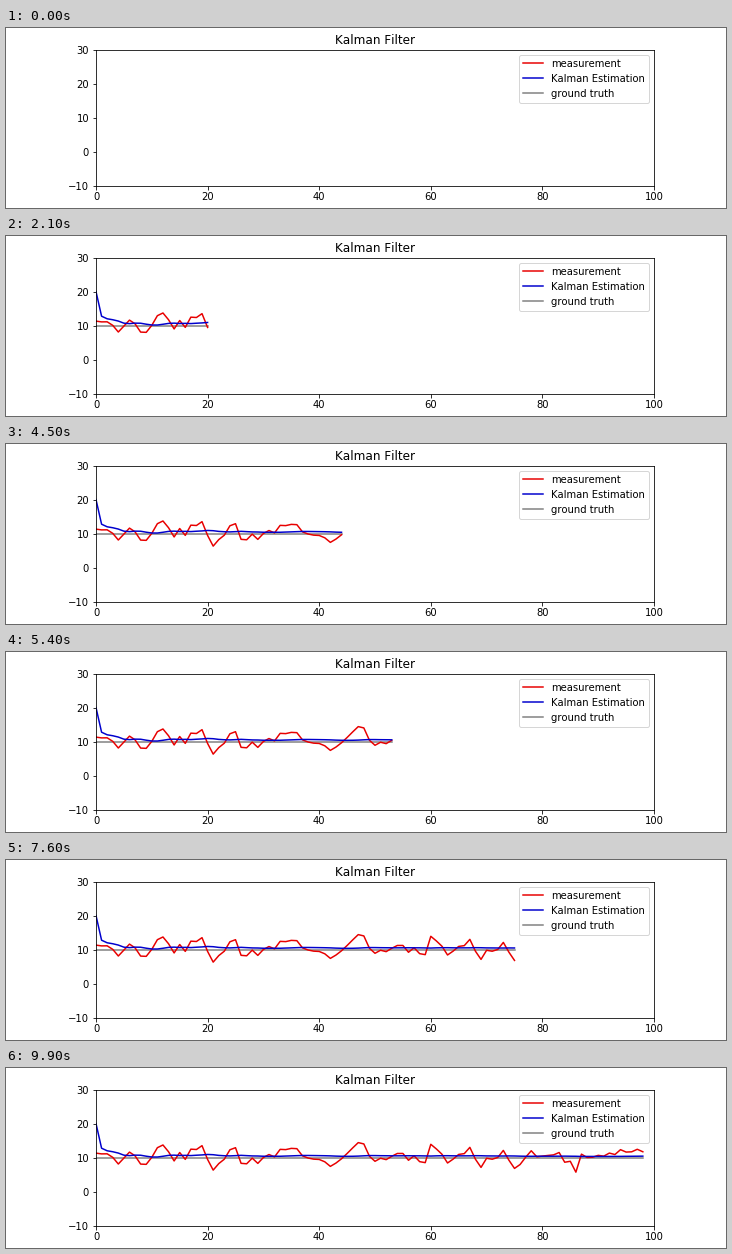
These frames come from a looping animation (720 by 180 pixels, 10 s). A matplotlib script:

```python
import matplotlib.pyplot as plt
import numpy as np
from matplotlib.animation import FuncAnimation

STEPS = 100
TRUTH = 10
START = 20        # initial state estimate
P0, R = 20, 4     # initial variance, measurement variance
JITTER = 0.7

# Main swings of the sensor; noise fills the steps between them.
SWINGS = [
    (0, 11.3), (2, 11.1), (4, 8.1), (6, 11.6), (9, 8.0), (12, 13.7),
    (14, 9.0), (19, 13.5), (21, 6.3), (25, 12.9), (26, 8.3), (35, 12.7),
    (42, 7.4), (47, 14.4), (50, 8.9), (54, 11.2), (59, 8.5), (60, 13.9),
    (63, 8.4), (67, 13.0), (69, 7.1), (73, 12.1), (75, 6.8), (78, 12.0),
    (85, 8.9), (86, 5.7), (87, 11.0), (98, 11.7),
]


def measure(swings, count, jitter):
    x, y = zip(*swings)
    noise = np.random.default_rng(4).normal(0, jitter, count)
    noise[list(x)] = 0
    return np.interp(np.arange(count), x, y) + noise


def kalman(zs, x, p, r):
    """Estimates of a constant state, each before its measurement is used."""
    out = []
    for z in zs:
        out.append(x)
        gain = p / (p + r)
        x += gain * (z - x)
        p *= 1 - gain
    return np.array(out)


measured = measure(SWINGS, STEPS - 1, JITTER)
estimate = kalman(measured, START, P0, R)
truth = np.full(len(measured), TRUTH)

plt.rcParams["font.family"] = "DejaVu Sans"
plt.rcParams["text.kerning_factor"] = 6   # whole-pixel letter spacing
fig, ax = plt.subplots(figsize=(10, 2.5), dpi=72)
fig.subplots_adjust(left=0.125, right=0.9, bottom=0.125, top=0.88)
ax.set(xlim=(0, 100), ylim=(-10, 30), title="Kalman Filter")

series = [
    (measured, "#e80000", "measurement", 2),
    (estimate, "mediumblue", "Kalman Estimation", 2),
    (truth, "gray", "ground truth", 1),
]
lines = [ax.plot([], [], color=color, label=name, zorder=z)[0]
         for _, color, name, z in series]
ax.legend(loc="upper right")


def update(n):
    for line, (values, *_) in zip(lines, series):
        line.set_data(np.arange(n), values[:n])
    return lines


anim = FuncAnimation(fig, update, frames=STEPS, interval=100,
                     repeat=True, repeat_delay=0)
plt.show()
```
